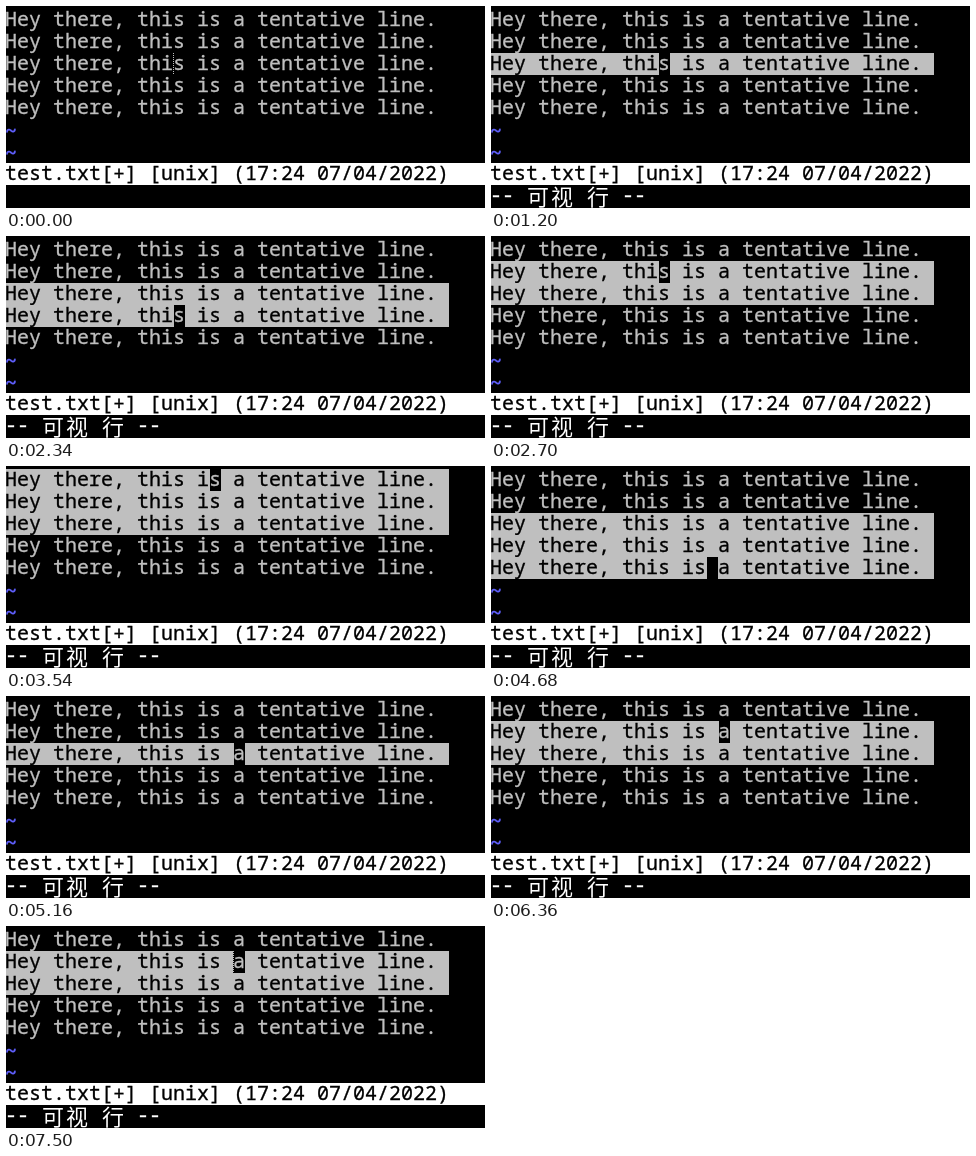
An HTML page that plays this animation: 479 by 202 pixels, repeating every 7560 ms.

```html
<!DOCTYPE html>
<html lang="en">
<head>
<meta charset="utf-8">
<title>Visual line mode</title>
<style>
  html, body { margin: 0; width: 100%; height: 100%; overflow: hidden; background: #000; }
  #term {
    position: relative; width: 479px; height: 202px; overflow: hidden;
    font: 20px/19px "Noto Sans Mono", "Noto Sans CJK SC", monospace;
    -webkit-text-stroke: .3px;
    font-variant-ligatures: none; white-space: pre; color: #bfbfbf;
  }
  #term > div { position: absolute; left: -1px; height: 22px; }
  .line { width: 444px; }
  .line.on { background: #bfbfbf; color: #000; }
  .tilde { color: #6060ff; font-weight: bold; line-height: 23px; }
  #term > .status { width: 480px; background: #fff; color: #000; }
  .mode { color: #fff; }
  .mode span {
    display: inline-block; width: 24px; text-align: center; vertical-align: top;
    font: 300 22px/21px "Noto Sans CJK SC", sans-serif; -webkit-text-stroke: 0;
  }
  #cursor { width: 12px; background: #000; }
  #cursor::before { content: ""; position: absolute; left: 0; top: 0; width: 1px; height: 22px; }
  #cursor.solid::before { background: #bfbfbf; }
  #cursor.dots::before { background: repeating-linear-gradient(#bfbfbf 0 1px, #000 1px 2px); }
</style>
</head>
<body>
<div id="term"></div>
<script>
  const TEXT = "Hey there, this is a tentative line.";
  const LOOP = 7560, ANCHOR = 2, VISUAL_AT = 1200;
  const term = document.getElementById("term");

  // [time, row, column, caret]
  const steps = [
    [0, 2, 14, "dots"], [360, 2, 14, "solid"], [840, 2, 14, ""],
    [1200, 2, 14, "solid"], [1680, 2, 14, ""], [1740, 3, 14, "solid"],
    [1980, 4, 14, "solid"], [2340, 3, 14, "solid"], [2520, 2, 14, "solid"],
    [2700, 1, 14, "solid"], [2880, 0, 14, "solid"], [3180, 0, 14, ""],
    [3240, 0, 15, "solid"], [3420, 0, 16, "solid"], [3540, 0, 17, "solid"],
    [3780, 1, 17, "solid"], [3900, 1, 17, ""], [3960, 2, 17, "solid"],
    [4080, 3, 17, "solid"], [4260, 4, 17, "solid"], [4680, 4, 18, "solid"],
    [4800, 4, 19, "solid"], [4980, 3, 19, "solid"], [5160, 2, 19, "solid"],
    [5340, 1, 19, "solid"], [5820, 1, 19, ""], [6360, 1, 19, "solid"],
    [6840, 1, 19, ""], [7380, 1, 19, "solid"], [7500, 1, 19, "dots"]
  ];

  function addRow(row, cls, html) {
    const el = document.createElement("div");
    el.className = cls;
    el.style.top = 3 + 22 * row + "px";
    el.innerHTML = html;
    return term.appendChild(el);
  }

  const lines = [0, 1, 2, 3, 4].map(row => addRow(row, "line", TEXT));
  addRow(5, "tilde", "~");
  addRow(6, "tilde", "~");
  addRow(7, "status", "test.txt[+] [unix] (17:24 07/04/2022)");
  const mode = addRow(8, "mode", "-- <span>可</span><span>视</span> <span>行</span> --");
  const cursor = addRow(0, "", "");
  cursor.id = "cursor";

  let shown;
  function draw(now) {
    const t = now % LOOP;
    const step = steps.findLast(s => s[0] <= t);
    if (step !== shown) {
      shown = step;
      const [time, row, col, caret] = step;
      const visual = time >= VISUAL_AT;
      const top = Math.min(row, ANCHOR), bottom = Math.max(row, ANCHOR);
      lines.forEach((el, i) => el.classList.toggle("on", visual && i >= top && i <= bottom));
      mode.hidden = !visual;
      cursor.className = caret;
      cursor.textContent = TEXT[col];
      cursor.style.left = 12 * col - 1 + "px";
      cursor.style.top = 3 + 22 * row + "px";
    }
  }

  const start = performance.now();
  function tick() {
    draw(performance.now() - start);
    requestAnimationFrame(tick);
  }
  tick();
</script>
</body>
</html>
```
